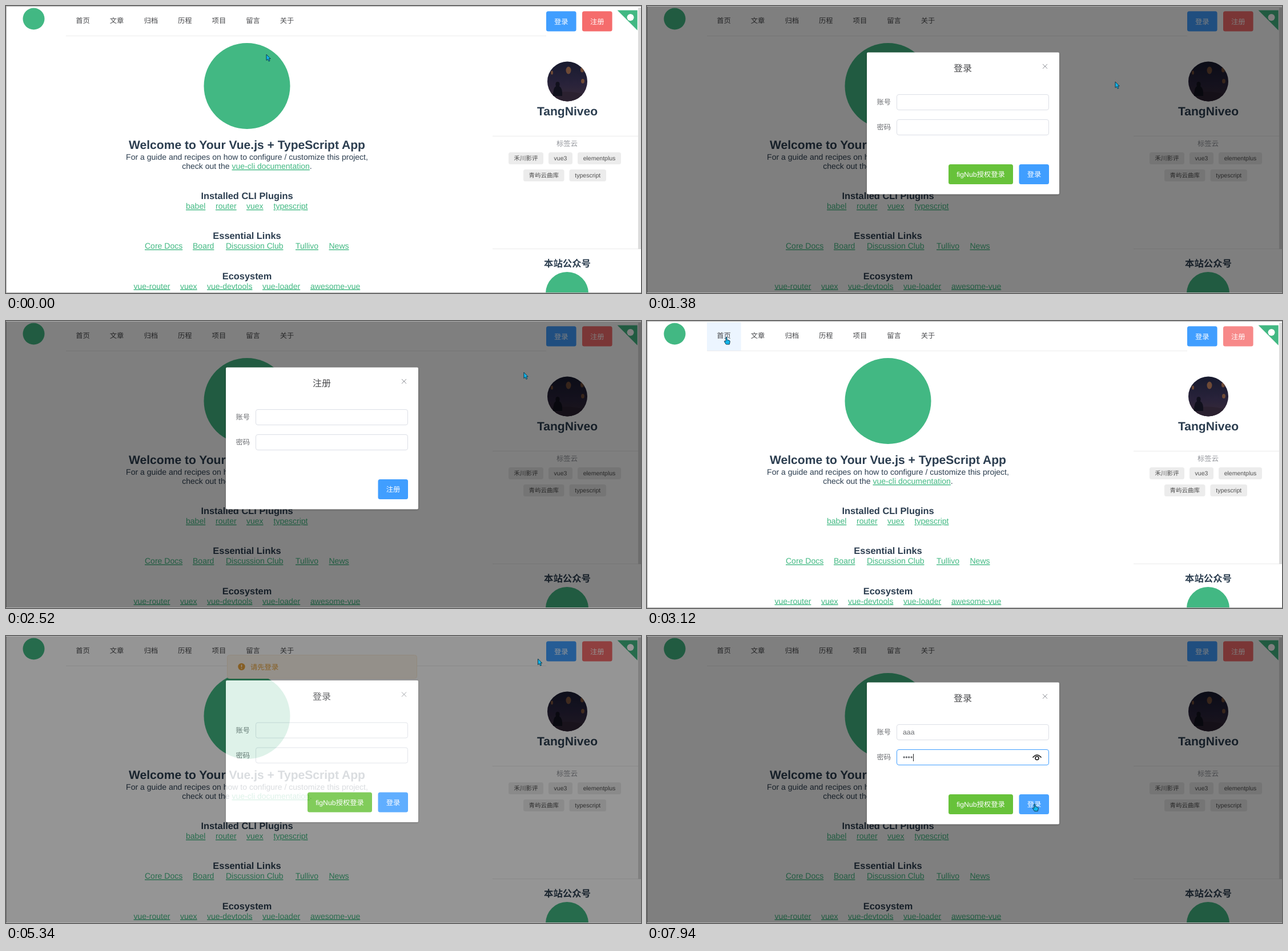
An HTML page for the animation above (8 s loop, 1112 by 504 pixels).

```html
<!DOCTYPE html>
<html lang="zh">
<head>
<meta charset="utf-8">
<title>Login demo</title>
<style>
  html, body { margin: 0; width: 100%; height: 100%; overflow: hidden; background: #fff; }
  svg { display: block; width: 1112px; height: 504px; }
  text {
    font: 300 12.3px "Liberation Sans", "Noto Sans CJK SC", "Noto Sans CJK", sans-serif;
    fill: #48494c; white-space: pre; text-rendering: geometricPrecision;
  }
  .mid { text-anchor: middle; }
  .btn { fill: #fff; font-weight: 400; }
  .bold { font-weight: 700; fill: #2c3e50; }
  .body { font-size: 14.03px; fill: #2c3e50; }
  .link { fill: #42b983; text-decoration: underline; }
  .h1 { font-size: 21.05px; }
  .h3 { font-size: 16.4px; }
  .tag { font-size: 10.5px; fill: #505050; }
  .label { fill: #6c6e72; }
  .line { stroke: #ebebeb; fill: none; }
</style>
</head>
<body>
<svg viewBox="0 0 1112 504">
  <defs>
    <clipPath id="round"><circle cx="983" cy="132.5" r="35"/></clipPath>
    <linearGradient id="dusk" x2="0" y2="1">
      <stop stop-color="#171a2e"/><stop offset=".55" stop-color="#28223a"/><stop offset="1" stop-color="#3a2b38"/>
    </linearGradient>
    <filter id="shadow"><feDropShadow dx="0" dy="1" stdDeviation="1.5" flood-opacity=".3"/></filter>
  </defs>
  <rect width="1112" height="504" fill="#fff"/>
  <g id="page"></g>

  <g clip-path="url(#round)">
    <rect x="948" y="97" width="70" height="71" fill="url(#dusk)"/>
    <path d="M948 154q35-8 70 2v14h-70z" fill="#2b2130"/>
    <g fill="#6e4a36">
      <ellipse cx="985" cy="113" rx="4.5" ry="6.500"/><ellipse cx="1009" cy="112" rx="3" ry="4.500"/>
      <ellipse cx="956" cy="117" rx="2" ry="3.500"/><ellipse cx="1010" cy="132" rx="3" ry="4"/>
    </g>
    <path d="M958 158q0-15 5-17q-2-8 3-8t3 8q6 3 5 17z" fill="#10101c"/>
  </g>

  <g id="message">
    <rect x="387.5" y="33.5" width="332" height="41" rx="4" fill="#fdf6ec" stroke="#faecd8"/>
    <circle cx="412.5" cy="54" r="6.2" fill="#e6a23c"/>
    <path d="M412.5 50.3v4.4m0 1.5v1.5" stroke="#fff" stroke-width="1.4"/>
    <text x="428" y="59" style="fill:#e6a23c">请先登录</text>
  </g>

  <g id="overlay">
    <rect width="1112" height="504" opacity=".5"/>
    <g id="dialog">
      <rect x="385" y="81.5" width="337" height="249" rx="2" fill="#fff" filter="url(#shadow)"/>
      <text id="title" class="mid" x="553" y="115" style="font-size:16px"></text>
      <path d="M693 102l8 8m0-8l-8 8" stroke="#909399"/>
      <text class="label" x="402.5" y="173">账号</text>
      <text class="label" x="402.5" y="217">密码</text>
      <rect id="accountBox" x="437.5" y="155.5" width="266" height="27" rx="3.5" fill="#fff"/>
      <rect id="secretBox" x="437.5" y="199.5" width="266" height="27" rx="3.5" fill="#fff"/>
      <text id="account" class="label" x="448" y="173"></text>
      <text id="secret" class="label" x="448" y="217"></text>
      <path id="caret" d="M.5 163v13" stroke="#222"/>
      <g id="eye" fill="none" stroke="#111" stroke-width="1.5">
        <path d="M675.5 213.5q7.5-9 15 0"/><circle cx="683" cy="214.5" r="3"/>
      </g>
      <g id="oauth">
        <rect x="528" y="278" width="113" height="35" rx="3.5" fill="#67c23a"/>
        <text class="mid btn" x="584.5" y="300">figNub授权登录</text>
      </g>
      <rect id="submit" x="651.5" y="278" width="52.5" height="35" rx="3.5"/>
      <text id="submitText" class="mid btn" x="678" y="300"></text>
    </g>
  </g>

  <path d="M0 .5H1112M0 503.5H1112" stroke="#b0b0b0"/>
  <g id="cursor" stroke="#0d2f40" stroke-linejoin="round">
    <path id="arrow" d="M0 0V10.5L2.4 8.4 4.2 12.2 6 11.3 4.3 7.6H7.3Z" fill="#12b5ea" stroke-width=".9"/>
    <path id="hand" d="M-1 1Q0-.5 1 1V5L5 6Q6.5 6.5 6.3 8.5L5.3 13H-.5L-3.5 8.5Q-4 6.5-2.5 7L-1 8Z" fill="#12b5ea" stroke-width=".9"/>
    <path id="beam" d="M-3.5-5H3.5M-3.5 5.5H3.5M0-5V5.5" stroke="#0b4a60" stroke-width="1.8"/>
  </g>
</svg>
<script>
const $ = id => document.getElementById(id);
const text = (x, y, cls, str) => `<text x="${x}" y="${y}" class="${cls}">${str}</text>`;
const box = (x, y, w, h, fill, attrs = '') =>
  `<rect x="${x}" y="${y}" width="${w}" height="${h}" fill="${fill}" ${attrs}/>`;
const disc = (x, y, r, fill) => `<circle cx="${x}" cy="${y}" r="${r}" fill="${fill}"/>`;
const links = (y, items) => items.map(([x, s]) => text(x, y, 'body link', s)).join('');
const tag = (x, y, w, s) => box(x, y, w, 21, '#ececec', 'rx="3.5"') + text(x + w / 2, y + 14.3, 'mid tag', s);
const button = (x, id, s) => box(x, 9.3, 52.6, 35.1, '', `rx="3.5" id="${id}"`) + text(x + 26.3, 31.7, 'mid btn', s);

const NAV_X = 105, NAV_W = 59.6;
const nav = ['首页', '文章', '归档', '历程', '项目', '留言', '关于'];
const green = '#42b883';

$('page').innerHTML =
  '<path class="line" d="M105 52.5H946M852 228.5H1107M852 426.5H1107"/>' +
  '<path d="M.5 0V504" stroke="#b0b0b0"/>' +
  box(1107, 3, 5, 424, '#dcdcdc') +
  box(0, 2, NAV_W, 50, '#ecf5ff', 'id="navHover"') +
  nav.map((s, i) => text(134.5 + NAV_W * i, 30.3, 'mid', s)).join('') +
  disc(48.5, 22.5, 19, green) + disc(422, 140.5, 75.5, green) + disc(982.5, 504.5, 37.5, green) +
  button(946, 'login', '登录') + button(1009, 'register', '注册') +
  `<path d="M1070.6 7.6H1105.7V42.7Z" fill="${green}"/>` + disc(1093.5, 20, 6, '#fff') +
  text(422, 251, 'mid bold h1', 'Welcome to Your Vue.js + TypeScript App') +
  text(422, 269.5, 'mid body', 'For a guide and recipes on how to configure / customize this project,') +
  text(422, 286, 'mid body', 'check out the <tspan class="link">vue-cli documentation</tspan>.') +
  text(422, 339, 'mid bold h3', 'Installed CLI Plugins') +
  links(356.3, [[315, 'babel'], [367, 'router'], [421, 'vuex'], [468.5, 'typescript']]) +
  text(422, 409, 'mid bold h3', 'Essential Links') +
  links(426.3, [[243, 'Core Docs'], [327, 'Board'], [385, 'Discussion Club'], [507, 'Tullivo'], [565.5, 'News']]) +
  text(422, 479.5, 'mid bold h3', 'Ecosystem') +
  links(496.5, [[223.5, 'vue-router'], [305, 'vuex'], [352, 'vue-devtools'], [449, 'vue-loader'], [533, 'awesome-vue']]) +
  text(983, 191.5, 'mid bold h1', 'TangNiveo') +
  '<text x="982.5" y="245.5" class="mid" style="fill:#909399">标签云</text>' +
  tag(880, 257, 61, '禾川影评') + tag(950, 257, 42, 'vue3') + tag(1001, 257, 76, 'elementplus') +
  tag(906, 287, 71.5, '青屿云曲库') + tag(986.5, 287, 64.5, 'typescript') +
  text(983, 457.5, 'mid bold h3', '本站公众号');

const bursts = [[150, 1110, 8], [1260, 2280, 9], [2400, 3360, 9], [3480, 4380, 8],
  [4530, 4950, 4], [5220, 6120, 8], [6270, 7230, 8], [7370, 7940, 5]];
function hold(t) {
  let held = 0;
  for (const [a, b, n] of bursts) {
    if (t < a) break;
    const step = (b - a) / (n - 1);
    held = a + step * Math.min(n - 1, Math.floor((t - a + 12) / step));
  }
  return held;
}

// Pointer stops: time, x, y
const path = [[0, 456, 85], [100, 456, 85], [700, 978, 27], [960, 978, 27], [1330, 820, 133],
  [1500, 820, 133], [1900, 1047, 21], [2300, 1047, 21], [2680, 820, 133], [2850, 820, 133],
  [3100, 139, 28], [3240, 139, 28], [3360, 196, 27], [4300, 200, 30], [4450, 215, 34],
  [4900, 978, 26], [5250, 978, 26], [5700, 600, 140], [6100, 523, 182.5], [7400, 523, 182.5],
  [7900, 679, 294.5], [8000, 679, 294.5]];
const dialogs = [[840, 1440, '登录'], [2090, 2800, '注册'], [5100, 9999, '登录']];
const accountKeys = [6500, 6630, 6770], secretKeys = [7080, 7220, 7360, 7500];

const ramp = (t, start, length) => Math.max(0, Math.min(1, (t - start) / length));
const typed = (keys, t) => keys.filter(k => t >= k).length;
const set = (id, name, value) => $(id).setAttribute(name, value);
const show = (id, on) => set(id, 'visibility', on ? 'inherit' : 'hidden');

function pointer(t) {
  const i = path.findIndex(p => p[0] > t);
  const [a, ax, ay] = path[i - 1], [b, bx, by] = path[i];
  const u = ramp(t, a, b - a), e = u * u * (3 - 2 * u);
  return [ax + (bx - ax) * e, ay + (by - ay) * e];
}

function draw(t) {
  const [x, y] = pointer(t);
  const over = (l, top, r, bottom) => x >= l && x < r && y >= top && y < bottom;

  const [opened, closed, title] = dialogs.filter(d => t >= d[0]).pop() || dialogs[0];
  const alpha = Math.min(ramp(t, opened, 300), 1 - ramp(t, closed, 300));
  const modal = alpha > 0;
  set('overlay', 'opacity', alpha);
  show('overlay', modal);
  set('dialog', 'transform', `translate(0 ${-20 * (1 - alpha)})`);
  $('title').textContent = $('submitText').textContent = title;
  show('oauth', title === '登录');

  const onNav = !modal && over(NAV_X, 2, NAV_X + NAV_W * nav.length, 52);
  const onLogin = !modal && over(946, 9, 999, 45);
  const onRegister = !modal && over(1009, 9, 1062, 45);
  show('navHover', onNav);
  set('navHover', 'x', NAV_X + NAV_W * Math.floor((x - NAV_X) / NAV_W));
  set('login', 'fill', onLogin ? '#66b1ff' : '#409eff');
  const pressed = t >= 1980 && t < 2090, focused = t >= 2700 && t < 4200;
  set('register', 'fill', pressed ? '#e06666' : onRegister || focused ? '#f78989' : '#f56c6c');

  const gone = t < 5000 ? 1 - ramp(t, 4200, 300) : ramp(t, 7190, 150);
  set('message', 'opacity', 1 - gone);
  set('message', 'transform', `translate(0 ${-(t < 5000 ? 40 : 8) * gone})`);

  const a = typed(accountKeys, t), s = typed(secretKeys, t);
  const inAccount = t >= 6100 && t < 6940, inSecret = t >= 6940;
  $('account').textContent = 'a'.repeat(a);
  $('secret').textContent = '•'.repeat(s);
  set('accountBox', 'stroke', inAccount ? '#409eff' : '#dcdfe6');
  set('secretBox', 'stroke', inSecret ? '#409eff' : '#dcdfe6');
  show('caret', inAccount || inSecret);
  const caretX = Math.round(448 + (inSecret ? 4.4 * s : 6.84 * a));
  set('caret', 'transform', `translate(${caretX} ${inSecret ? 44 : 0})`);
  show('eye', s > 0);

  const onSubmit = modal && over(651, 278, 704, 313);
  set('submit', 'fill', onSubmit ? '#4aa3ff' : '#409eff');

  const onField = modal && (over(438, 155, 704, 184) || over(438, 199, 704, 228));
  const onButton = onNav || onLogin || onRegister || onSubmit;
  set('cursor', 'transform', `translate(${x} ${y})`);
  show('hand', onButton);
  show('beam', onField);
  show('arrow', !onButton && !onField);
}

function tick() {
  draw(hold(performance.now() % 8000));
  requestAnimationFrame(tick);
}
tick();
</script>
</body>
</html>
```
